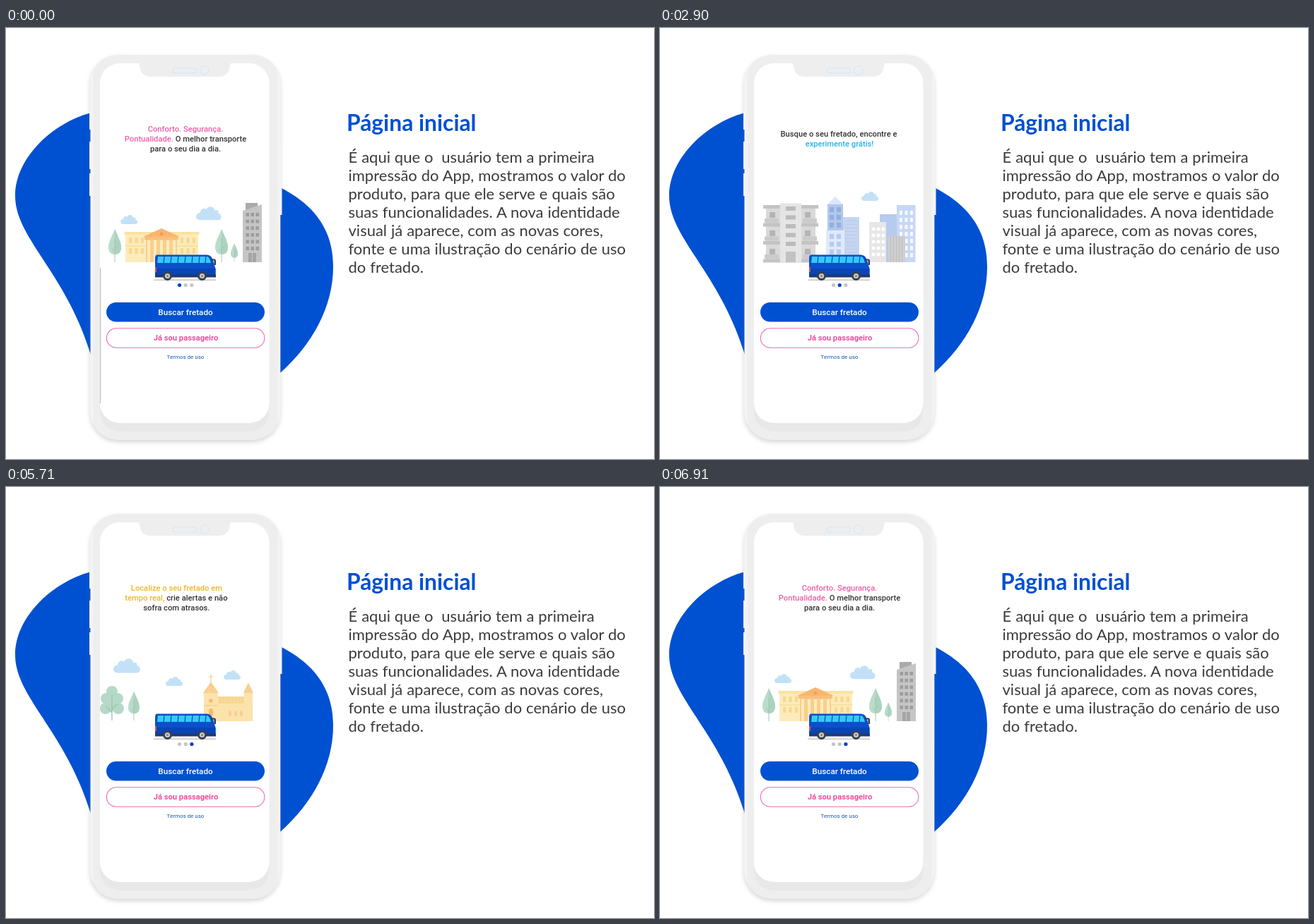
Write an HTML page that moves like this. It is 917 px wide and 611 px high and loops after 6940 ms.

```html
<!DOCTYPE html>
<html lang="pt-BR">
<head>
<meta charset="utf-8">
<title>Página inicial</title>
<style>
html, body { margin: 0; width: 100%; height: 100%; overflow: hidden; background: #fff; }
svg { display: block; width: 917px; height: 611px; }
.copy { font: 22px Lato, sans-serif; fill: #3b3b3b; word-spacing: .3px; }
.title { font: 700 31.8px Lato, sans-serif; fill: #0050d2; }
.app { font: 500 11.2px Roboto, sans-serif; text-anchor: middle; fill: #333; }
</style>
</head>
<body>
<svg viewBox="0 0 917 611">
  <defs>
    <clipPath id="screen"><rect x="133" y="50" width="239.5" height="510" rx="28"/></clipPath>
    <filter id="soft" x="-10%" y="-10%" width="120%" height="120%"><feGaussianBlur stdDeviation="3"/></filter>
    <linearGradient id="case" x1="0" x2="1">
      <stop offset="0" stop-color="#f8f8f8"/><stop offset=".02" stop-color="#eee"/>
      <stop offset=".98" stop-color="#eee"/><stop offset="1" stop-color="#f6f6f6"/>
    </linearGradient>
    <path id="cloud" fill="#c2e1f7" d="M4 13C-1.3 13-1.3 6 4 6C4 2 8 1 9.5 3C11-1 17-1 18 4C20 3 22 4 21 6.5C25 7 25 13 21 13Z"/>
    <g id="tree">
      <path fill="#b9dccb" d="M0-47C4-37 9-29 9-21C9-14 5-11 0-11C-5-11-9-14-9-21C-9-29-4-37 0-47Z"/>
      <path fill="#add3c0" d="M0-47C4-37 9-29 9-21C9-14 5-11 0-11Z"/>
      <path fill="none" stroke="#9cc6b1" d="M0 0V-33M0-18L4-23M0-14L-4-19"/>
    </g>
  </defs>

  <path fill="#0050d2" d="M119 120.500C66 135 13 184 13 238C13 298 84 345 120 463L388 489C434 448 463 395 463 338C463 285 435 250 388 226Z"/>

  <rect x="119" y="41" width="269" height="546" rx="40" fill="#777" opacity=".3" filter="url(#soft)"/>
  <path fill="#f1f1f1" d="M118 119h3v25h-3zM118 161h3v39h-3zM118 206h3v32h-3zM387 160h3.500v105h-3.500z"/>
  <rect x="119.500" y="38" width="268.800" height="546" rx="39" fill="url(#case)"/>
  <path fill="#e8e8e8" d="M133 530V540Q133 572 166 572H340Q372.500 572 372.500 540V530Z"/>
  <rect x="133" y="50" width="239.500" height="510" rx="28" fill="#fff"/>

  <g clip-path="url(#screen)">
    <g id="strip"></g>
    <path id="edge" stroke="#bbb" d="M133.500 340V532"/>
  </g>

  <path fill="#eee" d="M186 49H320Q317 50 317 54Q315 69 301 69H205Q191 69 189 54Q189 50 186 49Z"/>
  <rect x="236" y="57" width="34" height="7" rx="3.500" fill="#eaeff3" stroke="#dce4ea"/>
  <circle cx="281" cy="60" r="6.300" fill="#eaeff3" stroke="#dce4ea"/>

  <g id="bus"></g>
  <g id="dots"></g>

  <rect x="142" y="389" width="224" height="27.500" rx="13.750" fill="#0050d2"/>
  <rect x="142.300" y="425.800" width="223.600" height="27.400" rx="13.700" fill="#fff" stroke="#f06aae" stroke-width="1.100"/>
  <g class="app">
    <text x="254" y="406.500" style="font-size:11.700px;fill:#fff">Buscar fretado</text>
    <text x="254.500" y="443" style="font-size:11.200px;font-weight:700;fill:#ee4f9e">Já sou passageiro</text>
    <text x="254" y="469" style="font-size:8px;font-weight:400;fill:#1559b5">Termos de uso</text>
  </g>

  <text class="title" x="482" y="146">Página inicial</text>
  <g class="copy" id="copy"></g>
</svg>

<script>
const $ = id => document.getElementById(id);
const rect = (x, y, w, h, fill, more = '') =>
  `<rect x="${x}" y="${y}" width="${w}" height="${h}" fill="${fill}" ${more}/>`;
const path = (d, fill, more = '') => `<path d="${d}" fill="${fill}" ${more}/>`;
const circle = (x, y, r, fill) => `<circle cx="${x}" cy="${y}" r="${r}" fill="${fill}"/>`;
const put = (id, x, y, s = 1) => `<use href="#${id}" transform="translate(${x} ${y}) scale(${s})"/>`;
const line = (x, y, text) => `<text class="app" x="${x}" y="${y}">${text}</text>`;
const tint = (color, text) => `<tspan fill="${color}">${text}</tspan>`;

// Repeats a small shape over rows and columns.
function grid(x, y, cols, rows, dx, dy, shape) {
  let out = '';
  for (let r = 0; r < rows; r++)
    for (let c = 0; c < cols; c++) out += shape(x + c * dx, y + r * dy);
  return out;
}
const panes = (x, y, cols, rows, dx, dy, w, h, fill) =>
  grid(x, y, cols, rows, dx, dy, (a, b) => rect(a, b, w, h, fill));

function palace() {
  return rect(169, 291, 103, 41, '#fcebbb') + rect(167.5, 289, 106, 4, '#fbe2a3') +
    rect(169, 308, 103, 2, '#fae0a0') +
    panes(174, 297, 3, 2, 8.5, 15, 4, 8, '#f8d78d') +
    panes(247, 297, 3, 2, 8.5, 15, 4, 8, '#f8d78d') +
    rect(198, 297, 44, 35, '#f8cf8b') +
    panes(200, 301, 5, 1, 9, 0, 4, 31, '#fdebbd') +
    rect(196, 296, 48, 4, '#f9bf7d') + path('M194 296L220 284L246 296Z', '#f8b570') +
    circle(220, 292, 2.3, '#f39a56');
}

function grayTower() {
  return rect(339, 248, 17, 12, '#aaa') + path('M335 259L362 250V332H335Z', '#c5c5c5') +
    panes(339.5, 262, 3, 6, 7, 9.6, 4.5, 5, '#9d9d9d') +
    rect(343, 319, 11, 13, '#a5a5a5') + rect(348, 319, 1, 13, '#c5c5c5');
}

function flats() {
  return rect(150, 251, 70, 81, '#d9d9d9') +
    panes(146, 251, 1, 4, 0, 25.5, 78, 5, '#c4c4c4') +
    panes(155, 261, 2, 3, 50, 26, 8, 8, '#b4b4b4') +
    panes(148, 270, 2, 3, 54, 25.5, 20, 6, '#cbcbcb') +
    rect(170, 248.5, 30, 83.5, '#e5e5e5') +
    panes(178, 253, 1, 5, 0, 12.5, 14, 6, '#bbb') + rect(178, 317, 14, 15, '#c2c2c2');
}

function skyline() {
  return rect(259, 268, 23, 64, '#c5d5f2') +
    panes(262, 273, 1, 12, 0, 5, 17, 1, '#b8caec') +
    path('M237 250L248 239L259 250Z', '#dbe6f9') + rect(237, 250, 22, 82, '#b2c7ed') +
    panes(240, 254, 2, 3, 10, 11, 6, 7, '#93afe0') +
    rect(235, 287, 26, 45, '#dfe9fb') + panes(240, 292, 2, 3, 10, 11, 6, 7, '#b6cbf0') +
    rect(311, 264, 24, 68, '#b7cbee') + rect(335, 251, 26.5, 81, '#c7d7f6') +
    panes(339, 259, 3, 7, 7.5, 10, 4, 6, '#f6f9ff') +
    rect(296, 275, 24, 57, '#e7e7e7') +
    grid(302, 285, 3, 5, 7, 9, (x, y) => circle(x, y, 2.5, '#fff')) +
    rect(323, 295, 24, 37, '#cfcfcf') + panes(326, 295, 5, 1, 4, 0, 1, 37, '#bdbdbd');
}

function church() {
  const wall = '#fbe3ac', roof = '#f8d08f';
  return rect(292, 291, 20, 41, wall) + path('M291 292L302 276L313 292Z', roof) +
    path('M302 265V277M299 269H305', 'none', `stroke="${roof}" stroke-width="1.2"`) +
    rect(312, 305, 49, 27, wall) + rect(312, 297, 37, 10, '#f8d998') +
    grid(314, 299, 8, 3, 4.5, 3, (x, y) => rect(x, y, 2.5, 1, '#f5cb89')) +
    rect(349, 291, 12, 41, wall) + path('M348 292L355 277L362 292Z', roof) +
    circle(302, 303, 2.7, '#f6b873') + rect(292, 309, 20, 1.5, roof) +
    path('M299 324V317a3 3 0 0 1 6 0V324Z', '#f6b873') +
    grid(327, 325, 3, 1, 8, 0, (x, y) => path(`M${x} ${y}v-6a2 2 0 0 1 4 0v6Z`, '#f8d08f'));
}

function bigTree() {
  const blobs = [[162, 290, 8], [154, 300, 8], [170, 300, 8], [153, 314, 8], [171, 314, 8], [162, 308, 10]];
  return blobs.map(b => circle(...b, '#b5d9c8')).join('') +
    path('M162 331V294M162 315L170 307M162 320L154 311', 'none', 'stroke="#98c4af" stroke-width="1.3"');
}

const pink = '#ee5fa8', cyan = '#22b3ea', amber = '#f0b429';
const first =
  line(254, 147, tint(pink, 'Conforto. Segurança.')) +
  line(254, 160.5, tint(pink, 'Pontualidade.') + ' O melhor transporte') +
  line(254, 174.5, 'para o seu dia a dia.') +
  put('cloud', 162, 265) + put('cloud', 269, 253, 1.48) +
  put('tree', 154, 332) + put('tree', 305, 332) + put('tree', 323, 332, .57) +
  palace() + grayTower();
const second =
  line(253, 153.5, 'Busque o seu fretado, encontre e') +
  line(254, 167.5, tint(cyan, 'experimente grátis!')) +
  put('cloud', 285, 232) + flats() + skyline();
const third =
  line(253.5, 147, tint(amber, 'Localize o seu fretado em')) +
  line(253, 160.5, tint(amber, 'tempo real,') + ' crie alertas e não') +
  line(253.5, 174.5, 'sofra com atrasos.') +
  put('cloud', 164, 243, 1.58) + put('cloud', 238, 269) + put('cloud', 320, 260) +
  bigTree() + put('tree', 193, 331, .88) + church();

const pitch = 240;
$('strip').innerHTML = [first, second, third, first]
  .map((slide, i) => `<g transform="translate(${i * pitch})">${slide}</g>`).join('');

$('bus').innerHTML =
  rect(209, 356.5, 88, 1.5, '#c9c5c2') +
  path('M214 321.5H284Q290 321.5 292.5 328L296.5 341V353H211V326Q211 321.5 214 321.5Z', '#0b4fcb') +
  path('M211 341H296.5V353H211Z', '#0845b6') +
  path('M211 349.5H297V353.5H211Z', '#23386d') +
  path('M215 324H284Q288 324 290 333H214Z', '#35c9f7') +
  path([223, 233, 243, 253, 263, 273, 282].map(x => `M${x + 1} 323L${x} 334`).join(''),
    'none', 'stroke="#0b4fcb" stroke-width="1.3"') +
  path('M290 327.5H295Q297 327.5 297 330V336H294.5V329.5H290Z', '#333b4c') +
  rect(211, 339, 2, 7, '#e8434e') +
  [228.5, 277.5].map(x => circle(x, 351.5, 6.5, '#3b4049') +
    circle(x, 351.5, 3.6, '#c8ccd2') + circle(x, 351.5, 1.5, '#777d87')).join('');

$('dots').innerHTML = [245.5, 254.2, 262.9].map(x => circle(x, 364.5, 2.6, '#c4c4c4')).join('');

$('copy').innerHTML = [
  'É aqui que o\u00a0 usuário tem a primeira',
  'impressão do App, mostramos o valor do',
  'produto, para que ele serve e quais são',
  'suas funcionalidades. A nova identidade',
  'visual já aparece, com as novas cores,',
  'fonte e uma ilustração do cenário de uso',
  'do fretado.'
].map((text, i) => `<text x="484.5" y="${190.5 + i * 26}">${text}</text>`).join('');

const smooth = u => u * u * (3 - 2 * u);
const step = (t, from) => from + Math.floor((t - from) / 30) * 30;

function slidePos(t) {
  if (t < 2000) return 0;
  if (t < 2900) return smooth((step(t, 2000) - 1910) / 990);
  if (t < 4900) return 1;
  t = step(t, 4900);
  if (t < 5560) return 1 + smooth((t - 4860) / 700);
  return 2 + Math.min(1, (t - 5560) / 1350) ** 1.36;
}

const start = performance.now();
function draw() {
  const t = (performance.now() - start) % 6940;
  const active = t < 2900 ? 0 : t < 5560 ? 1 : 2;
  $('strip').setAttribute('transform', `translate(${-pitch * slidePos(t)})`);
  $('edge').style.display = t < 2000 ? '' : 'none';
  [...$('dots').children].forEach((dot, i) => dot.setAttribute('fill', i === active ? '#0844b5' : '#c4c4c4'));
  requestAnimationFrame(draw);
}
draw();
</script>
</body>
</html>
```
